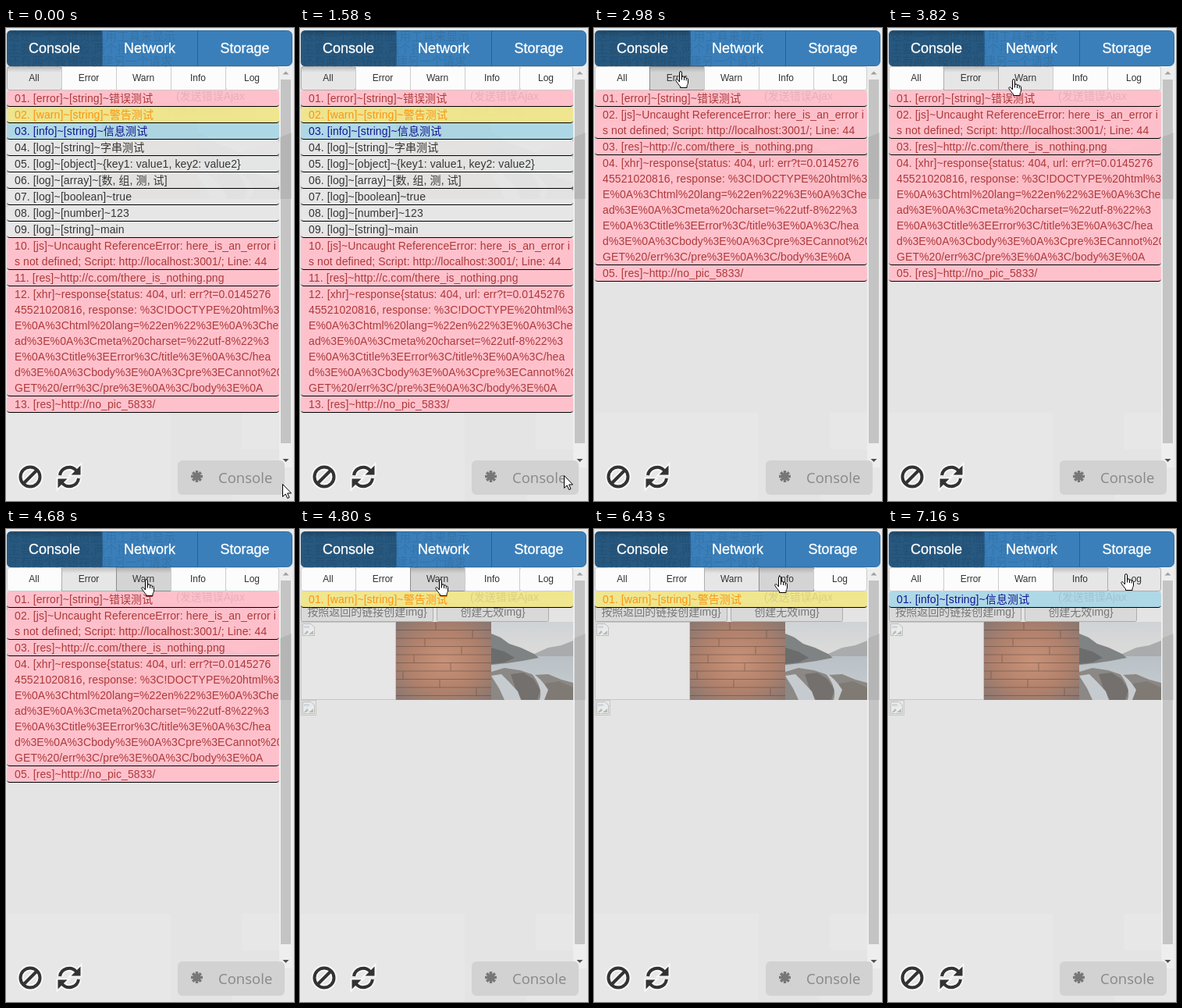
An HTML page that plays this animation: 369 by 606 pixels, repeating every 8000 ms.

```html
<!DOCTYPE html>
<html lang="zh">
<head>
<meta charset="utf-8">
<title>Console panel</title>
<style>
html, body { margin: 0; width: 100%; height: 100%; overflow: hidden; background: #e9e9e9; }
svg { display: block; }
text { font-family: "Liberation Sans", Arial, "Noto Sans CJK SC", "Noto Sans CJK", sans-serif; white-space: pre; }
.row { font-size: 14px; letter-spacing: .09px; fill-opacity: .9; }
.mid { text-anchor: middle; }
.ghost { font-size: 15px; fill: #000; opacity: .09; }
</style>
</head>
<body>
<svg id="stage" width="369" height="606" viewBox="0 0 369 606">
  <defs>
    <linearGradient id="inset" x2="0" y2="1">
      <stop offset="0" stop-opacity=".16"/><stop offset="1" stop-opacity="0"/>
    </linearGradient>
    <radialGradient id="wood" r=".72">
      <stop offset="0" stop-color="#c99278"/><stop offset=".5" stop-color="#b3826c"/><stop offset="1" stop-color="#857672"/>
    </radialGradient>
    <linearGradient id="sky" x2="0" y2="1">
      <stop offset="0" stop-color="#cfd3d6"/><stop offset=".4" stop-color="#dcdbd9"/>
    </linearGradient>
    <linearGradient id="water" x2="0" y2="1">
      <stop offset="0" stop-color="#b9c0c5"/><stop offset="1" stop-color="#c8ced2"/>
    </linearGradient>
    <clipPath id="shot"><rect x="245" y="119" width="105" height="100"/></clipPath>
  </defs>
  <rect x="1" y="49" width="366" height="557" fill="#e4e4e4"/>
  <path d="M1 493H211V606H1ZM302 493H350V540H302ZM290 563H367V606H290Z" fill="#e7e7e7"/>
  <g id="page"></g>
  <g id="photos">
    <rect x="123" y="119" width="122" height="100" fill="url(#wood)"/>
    <g id="planks"></g>
    <g clip-path="url(#shot)">
      <rect x="245" y="119" width="105" height="100" fill="url(#sky)"/>
      <path d="M245 160H350V219H245Z" fill="url(#water)"/>
      <path d="M300 160L318 152 335 149 350 143V163H300Z" fill="#a9abac"/>
      <path d="M245 134L257 139 268 147 283 152 300 160 306 165 285 169 265 172 245 174Z" fill="#808383"/>
      <path d="M245 152L262 157 275 165 262 171 245 173Z" fill="#6b6d6c"/>
      <path d="M245 183L262 178 282 181 300 187 318 186 335 193 350 197V219H245Z" fill="#8b8885"/>
      <path d="M270 186L286 184 299 192 308 206 304 219H284L276 204Z" fill="#74706d"/>
      <path d="M314 198L332 195 350 203V219H308Z" fill="#807a75"/>
      <path d="M245 188L258 186 268 196 279 208 283 219H262L255 204Z" fill="#c5cbcf"/>
      <path d="M296 184Q308 190 318 206L313 219H307Q312 203 296 184Z" fill="#c8ccce"/>
    </g>
  </g>
  <g id="lists"></g>
  <g id="tabs"></g>
  <g id="bar">
    <rect x="350" y="49" width="17" height="514" fill="#eeeeee"/>
    <rect x="352" y="66" width="13" height="466" fill="#c4c4c4"/>
    <path d="M351 140L366 134V219H351Z" fill="#888" opacity=".25"/>
    <path d="M354.5 59.5L358.5 55.5 362.5 59.5Z" fill="#a0a0a0"/>
    <path d="M354.5 552L358.5 556 362.5 552Z" fill="#505050"/>
  </g>
  <g id="nav"></g>
  <g id="tools">
    <g id="halo" stroke="#f8f8f8"></g>
    <g id="icons" stroke="#333" fill="#333"></g>
    <rect x="220" y="554" width="137" height="44" rx="6" fill="#d2d2d2"/>
    <path id="star" stroke="#777" stroke-width="3.4"/>
    <text x="272" y="583" fill="#888" style="font:18.5px 'Open Sans','Noto Sans',sans-serif">Console</text>
  </g>
  <g id="cursor">
    <path d="M.5.5V16.5L4.2 13 6.7 18.5 9 17.5 6.6 12H11.5Z" fill="#fff" stroke="#000"/>
    <path d="M0 .5H3M4 .5H7M3.5 1V15M0 15.5H3M4 15.5H7" fill="none" stroke="#222"/>
    <g stroke="#000" stroke-linejoin="round">
      <path d="M5.5 14V2.2a1.5 1.5 0 0 1 3 0V8c0-1.5 3-1.5 3 0V9c0-1.5 2.7-1.3 2.7.3V10c0-1 2.3-1 2.3.6V15c0 2-1.5 3-1.5 5V21.5H6.5V20C5 18 2 14.5 1 12.5 .3 11 2 10 3.3 11.3Z" fill="#fff"/>
      <path d="M8.5 8V11.5M11.5 9V12M14.2 10V12.5" fill="none"/>
    </g>
  </g>
</svg>
<script>
const NS = 'http://www.w3.org/2000/svg';
const $ = id => document.getElementById(id);

function add(parent, tag, attrs, txt) {
  const el = document.createElementNS(NS, tag);
  for (const k in attrs) el.setAttribute(k, attrs[k]);
  if (txt) el.textContent = txt;
  parent.appendChild(el);
  return el;
}

// Page behind the panel
function broken(x, y, w, h) {
  const page = $('page');
  add(page, 'rect', { x: x + .5, y: y + .5, width: w - 1, height: h - 1, fill: '#e6e6e6', stroke: '#c6c6c6' });
  const g = add(page, 'g', { transform: `translate(${x + 2} ${y + 2})`, opacity: .6 });
  add(g, 'path', { d: 'M.5.5H11L15.5 5V15.5H.5Z', fill: '#eceef0', stroke: '#a0a0a0' });
  add(g, 'path', { d: 'M2 14L6 9 9 12 14 8V14Z', fill: '#93a591' });
  add(g, 'path', { d: 'M2 3H9V6H2Z', fill: '#c3cbd6' });
  add(g, 'path', { d: 'M15 7L5 15', stroke: '#f4f4f4', 'stroke-width': 2 });
}

function pageButton(x, w, label) {
  add($('page'), 'rect', { x: x + .5, y: 95.5, width: w - 1, height: 23, rx: 2, fill: '#d9d9d9', stroke: '#adadad' });
  add($('page'), 'text', { x: x + w / 2, y: 111, class: 'mid', 'font-size': 14, fill: '#777' }, label);
}

pageButton(1, 170, '按照返回的链接创建img}');
pageButton(175, 144, '创建无效img}');
broken(1, 119, 122, 100);
broken(1, 219, 20, 20);

for (let i = 1; i < 10; i++) {
  const y = 119 + i * 10.5, x = 127 + i * 47 % 108;
  add($('planks'), 'path', { d: `M123 ${y}H245M${x} ${y - 10}v10`, stroke: '#4f403a', opacity: .45 });
}

// Log rows
const LOOK = {
  error: ['#ffc0cb', '#a52a2a'],
  warn: ['#f0e68c', '#ff8c00'],
  info: ['#add8e6', '#00008b'],
  log: ['#e7e7e7', '#222']
};
const LOGS = [
  ['error', '[error]~[string]~错误测试'],
  ['warn', '[warn]~[string]~警告测试'],
  ['info', '[info]~[string]~信息测试'],
  ['log', '[log]~[string]~字串测试'],
  ['log', '[log]~[object]~{key1: value1, key2: value2}'],
  ['log', '[log]~[array]~[数, 组, 测, 试]'],
  ['log', '[log]~[boolean]~true'],
  ['log', '[log]~[number]~123'],
  ['log', '[log]~[string]~main'],
  ['error', '[js]~Uncaught ReferenceError: here_is_an_error i', 's not defined; Script: http://localhost:3001/; Line: 44'],
  ['error', '[res]~http://c.com/there_is_nothing.png'],
  ['error', '[xhr]~response{status: 404, url: err?t=0.0145276',
    '45521020816, response: %3C!DOCTYPE%20html%3',
    'E%0A%3Chtml%20lang=%22en%22%3E%0A%3Che',
    'ad%3E%0A%3Cmeta%20charset=%22utf-8%22%3',
    'E%0A%3Ctitle%3EError%3C/title%3E%0A%3C/hea',
    'd%3E%0A%3Cbody%3E%0A%3Cpre%3ECannot%20',
    'GET%20/err%3C/pre%3E%0A%3C/body%3E%0A'],
  ['error', '[res]~http://no_pic_5833/']
];

function buildList(kind) {
  const g = add($('lists'), 'g', {});
  let y = 80;
  LOGS.filter(r => kind === 'all' || r[0] === kind).forEach(([type, ...lines], i) => {
    const [bg, ink] = LOOK[type], h = lines.length * 20, b = y + h;
    add(g, 'rect', { x: 1, y, width: 349, height: h + .5, rx: 4, fill: bg, opacity: .96 });
    add(g, 'path', { d: `M1 ${b - 3}Q1 ${b + 1} 5 ${b + 1}H346Q350 ${b + 1} 350 ${b - 3}Q350 ${b} 346 ${b}H5Q1 ${b} 1 ${b - 3}Z` });
    lines.forEach((s, n) => {
      const num = n ? '' : String(i + 1).padStart(2, '0') + '. ';
      add(g, 'text', { x: 11, y: y + 15 + n * 20, class: 'row', fill: ink }, num + s);
    });
    y = b + 1;
  });
  return g;
}

const KINDS = ['all', 'error', 'warn', 'info'];
const lists = KINDS.map(buildList);
add($('lists'), 'text', { x: 218, y: 92, 'font-size': 14, opacity: .09 }, '(发送错误Ajax');

// Filter tabs
const tabs = ['All', 'Error', 'Warn', 'Info', 'Log'].map((name, i) => {
  const x = 1 + i * 70, w = i < 4 ? 70 : 68;
  const box = add($('tabs'), 'rect', { x: x + .5, y: 49.5, width: w, height: 30, rx: i % 4 ? 0 : 3 });
  const shade = add($('tabs'), 'rect', { x: x + 1, y: 50, width: w - 1, height: 7, fill: 'url(#inset)' });
  add($('tabs'), 'text', { x: x + w / 2, y: 68, class: 'mid', 'font-size': 12, fill: '#333' }, name);
  return { box, shade };
});

// Main navigation
const nav = $('nav');
add(nav, 'rect', { x: 1.5, y: 3.5, width: 365, height: 45, rx: 6, fill: '#3a7fba', stroke: '#2e6da4' });
add(nav, 'path', { d: 'M123 3H7Q1 3 1 9V43Q1 49 7 49H123Z', fill: '#27587f' });
add(nav, 'rect', { x: 2, y: 4, width: 121, height: 7, rx: 4, fill: 'url(#inset)' });
add(nav, 'path', { d: 'M123.5 3V49M245.5 3V49', stroke: '#28618f' });
['这是一个测试页面,用工具来显示', '主要有三个面板,两个按钮在下,', '还有两个按钮在创建另一个请求'].forEach((s, i) =>
  add(nav, 'text', { x: 3, y: 16 + i * 16, class: 'ghost' }, s));
['Console', 'Network', 'Storage'].forEach((s, i) =>
  add(nav, 'text', { x: 62 + i * 122, y: 32, class: 'mid', 'font-size': 18, fill: '#fff', stroke: '#fff', 'stroke-width': .3 }, s));

// Toolbar icons, first as a light halo, then dark
function icons(g, width, edge) {
  add(g, 'circle', { cx: 31, cy: 575, r: 12.5, fill: 'none', 'stroke-width': width });
  add(g, 'path', { d: 'M22.5 583.5L39.5 566.5', 'stroke-width': width });
  for (const turn of [0, 180]) {
    const half = add(g, 'g', { transform: `rotate(${turn} 81 575)` });
    add(half, 'path', { d: 'M69 573A12 12 0 0 1 90 567', fill: 'none', 'stroke-width': width });
    add(half, 'path', { d: 'M95.5 560.5V572.5H83.5Z', 'stroke-width': edge });
  }
}
icons($('halo'), 8, 4);
icons($('icons'), 4, 0);

$('star').setAttribute('d', [0, 1, 2, 3].map(i => {
  const a = i * Math.PI / 4, dx = 7.5 * Math.cos(a), dy = 7.5 * Math.sin(a);
  return `M${244.5 - dx} ${574.5 - dy}L${244.5 + dx} ${574.5 + dy}`;
}).join(''));

// Pointer: time, shape (0 arrow, 1 beam, 2 hand), x, y
const MOVES = [
  [0, 0, 354, 584], [400, 0, 353, 584], [1580, 0, 338, 573], [1700, 0, 290, 539],
  [1850, 1, 222, 340], [1980, 1, 150, 162],
  [2130, 2, 112, 65], [2280, 2, 109, 55], [2400, 2, 107, 50], [2550, 2, 106, 52], [2680, 2, 104, 55],
  [3260, 2, 104, 57], [3510, 2, 150, 65], [3820, 2, 154, 65], [3980, 2, 167, 64], [4250, 2, 173, 64],
  [5580, 2, 180, 60], [5730, 2, 202, 60], [5880, 2, 214, 60], [6000, 2, 225, 60], [6150, 2, 231, 60],
  [6740, 2, 264, 60], [6860, 2, 290, 59], [7020, 2, 297, 57], [7160, 2, 298, 57]
];
// time, value
const SHOWN = [[0, 0], [2980, 1], [4800, 2], [6590, 3]];
const PRESS = [[0, -1], [4680, 2], [4800, -1], [6430, 3], [6590, -1]];
const at = (steps, t) => steps.findLast(s => s[0] <= t);

function draw(t) {
  const [, shape, x, y] = at(MOVES, t);
  const shown = at(SHOWN, t)[1], press = at(PRESS, t)[1];
  const hover = shape === 2 ? Math.floor((x + 5) / 70) : -1;
  $('cursor').setAttribute('transform', `translate(${x} ${y})`);
  [...$('cursor').children].forEach((c, i) => c.style.display = i === shape ? '' : 'none');
  lists.forEach((g, i) => g.style.display = i === shown ? '' : 'none');
  tabs.forEach(({ box, shade }, i) => {
    const on = i === shown || i === press, over = i === hover;
    box.setAttribute('fill', on && over ? '#d4d4d4' : on || over ? '#e6e6e6' : '#fcfcfc');
    box.setAttribute('stroke', on && over ? '#8c8c8c' : on || over ? '#adadad' : '#ccc');
    shade.style.display = on ? '' : 'none';
  });
}

function loop() {
  draw(performance.now() % 8000);
  requestAnimationFrame(loop);
}
loop();
</script>
</body>
</html>
```
